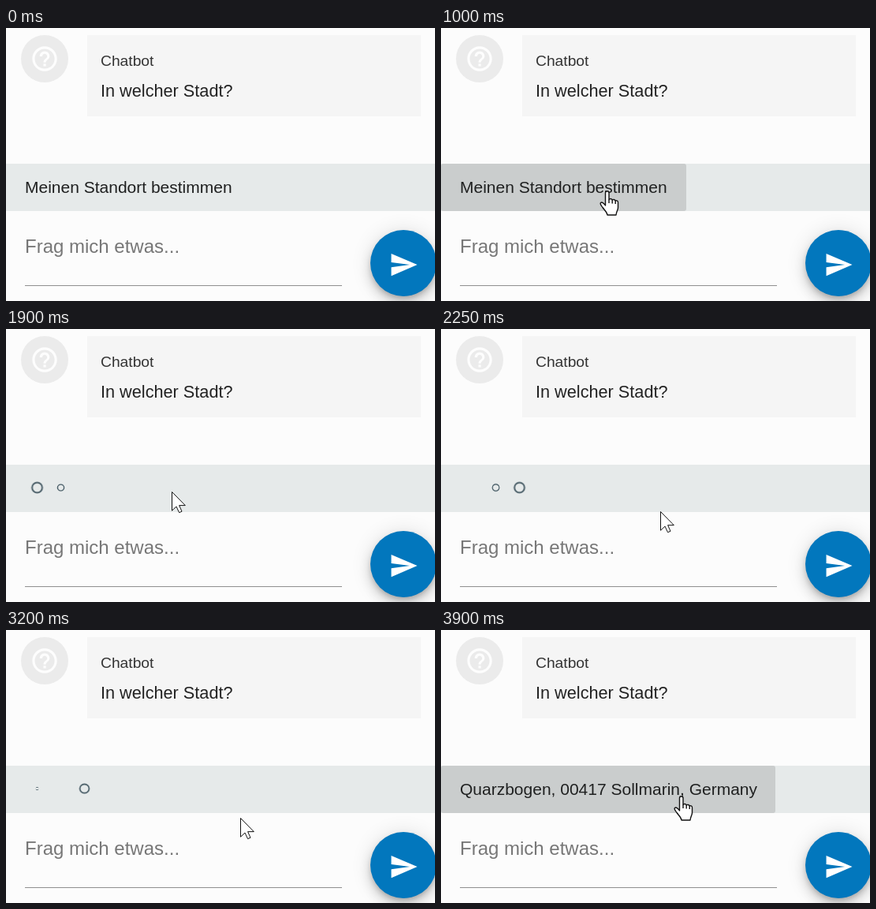
These frames come from a looping animation (544x346 px, 4.25 s). An HTML page:

```html
<!DOCTYPE html>
<html lang="de">
<head>
<meta charset="utf-8">
<title>Chatbot</title>
<style>
  html, body { margin: 0; width: 100%; height: 100%; overflow: hidden; background: #fcfcfc; }
  svg { position: absolute; left: 0; top: 0; width: 544px; height: 346px; }
  text { font-family: "Liberation Sans", Arial, sans-serif; font-size: 21px; fill: #1f2020; }

  .send {
    position: absolute; left: 462px; top: 256px; width: 84px; height: 84px;
    border-radius: 50%; background: #0277bd;
    box-shadow: 0 4.5px 7.5px -1.5px rgba(0,0,0,.2), 0 9px 15px rgba(0,0,0,.14),
                0 1.5px 27px rgba(0,0,0,.12);
  }

  .locate, .address, .dots, .arrow, .hand, .pressed { animation: 4250ms step-end infinite; }
  .locate  { animation-name: locate; }
  .address { animation-name: address; }
  .dots    { animation-name: dots; }
  .arrow   { animation-name: arrow; }
  .hand    { animation-name: hand; }
  .pressed { animation-name: pressed; }
  @keyframes locate  { 0% { opacity: 1 } 36.471%, 100% { opacity: 0 } }
  @keyframes address { 0% { opacity: 0 } 83.529%, 100% { opacity: 1 } }
  @keyframes dots    { 0% { opacity: 0 } 36.471% { opacity: 1 } 83.529%, 100% { opacity: 0 } }
  @keyframes pressed { 0% { opacity: 0 } 31.765%, 100% { opacity: 1 } }
  @keyframes arrow {
    0% { opacity: 0 } 8.235% { opacity: 1 } 17.647% { opacity: 0 }
    34.118% { opacity: 1 } 83.529%, 100% { opacity: 0 }
  }
  @keyframes hand {
    0% { opacity: 0 } 17.647% { opacity: 1 } 34.118% { opacity: 0 } 83.529%, 100% { opacity: 1 }
  }

  .hover { opacity: 0; animation: hover 4250ms linear infinite; }
  @keyframes hover {
    0%, 17% { opacity: 0 } 20%, 36.471% { opacity: .125 }
    36.48%, 84.706% { opacity: 0 } 88.235%, 100% { opacity: .125 }
  }

  .ripple { animation: ripple 4250ms cubic-bezier(0,0,.2,1) infinite; }
  @keyframes ripple {
    0%, 30.588% { transform: scale(0) } 40.588%, 100% { transform: scale(1) }
  }

  /* half-sine pulses of 620 ms, one every 800 ms */
  .dot { fill: none; stroke: #455a64; stroke-width: 2; transform: scale(0); animation: pulse 4250ms infinite; }
  .dot.b { animation-delay: 220ms; }
  .dot.c { animation-delay: 440ms; }
  @keyframes pulse {
    0%, 36.471%, 55.294%, 74.118% { transform: scale(0); animation-timing-function: cubic-bezier(.36,.57,.64,1); }
    43.765%, 62.588%, 81.412% { transform: scale(1); animation-timing-function: cubic-bezier(.36,0,.64,.43); }
    51.059%, 69.882%, 88.706%, 100% { transform: scale(0); }
  }

  .cursor { stroke: #111; stroke-linejoin: round; fill: #fff; animation: move 4250ms cubic-bezier(.45,0,.55,1) infinite; }
  @keyframes move {
    0%, 8.235% { transform: translate(318px, 290px) }
    23.529%, 45.882% { transform: translate(210px, 206px) }
    56.471% { transform: translate(297px, 238px) }
    82.353% { transform: translate(297px, 238px); animation-timing-function: linear }
    84.706% { transform: translate(311px, 226px); animation-timing-function: ease-out }
    91.765%, 100% { transform: translate(304px, 210px) }
  }
</style>
</head>
<body>
<div class="send"></div>
<svg viewBox="0 0 544 346">
  <defs>
    <clipPath id="chip"><rect y="172" width="311" height="60" rx="3"/></clipPath>
  </defs>

  <circle cx="49" cy="39" r="30" fill="#ebebeb"/>
  <path transform="translate(30.2 20.2) scale(1.57)" fill="#fdfdfd" d="M11 18h2v-2h-2v2zm1-16C6.48 2 2 6.48 2 12s4.48 10 10 10 10-4.48 10-10S17.52 2 12 2zm0 18c-4.41 0-8-3.59-8-8s3.59-8 8-8 8 3.59 8 8-3.59 8-8 8zm0-14c-2.21 0-4 1.79-4 4h2c0-1.1.9-2 2-2s2 .9 2 2c0 2-3 1.75-3 5h2c0-2.25 3-2.5 3-5 0-2.21-1.79-4-4-4z"/>
  <rect x="103" y="9" width="423" height="103" fill="#f5f5f5"/>
  <text x="120" y="48" style="font-size:19.25px;fill:#333">Chatbot</text>
  <text x="120" y="87" style="font-size:21.7px;fill:#222">In welcher Stadt?</text>

  <rect y="172" width="544" height="60" fill="#e6eaea"/>
  <g class="locate">
    <rect class="hover" y="172" width="311" height="60" rx="3"/>
    <g class="pressed" clip-path="url(#chip)">
      <g transform="translate(211 206)"><circle class="ripple" r="214" fill-opacity=".1"/></g>
    </g>
    <text x="24" y="209">Meinen Standort bestimmen</text>
  </g>
  <g class="dots">
    <g transform="translate(39.5 201)"><circle class="dot" r="6.6"/></g>
    <g transform="translate(69.5 201)"><circle class="dot b" r="6.6"/></g>
    <g transform="translate(99.5 201)"><circle class="dot c" r="6.6"/></g>
  </g>
  <g class="address">
    <rect class="hover" y="172" width="424" height="60" rx="3"/>
    <text x="24" y="209">Quarzbogen, 00417 Sollmarin, Germany</text>
  </g>

  <text x="24" y="285" style="font-size:24px;fill:#777">Frag mich etwas...</text>
  <rect x="24" y="326" width="402" height="1" fill="#8f8f8f"/>
  <path transform="translate(485.4 281.2) scale(1.57)" fill="#fff" d="M2.01 21L23 12 2.01 3 2 10l15 2-15 2z"/>

  <g class="cursor">
    <path class="arrow" d="M.5.5V24.2L6 19L9.6 26.7L13 25.2L9.6 17.6H17.3Z"/>
    <g class="hand" transform="translate(-9 0)" stroke-width="1.4">
      <path d="M7.5 19V3a2.2 2.2 0 0 1 4.5 0v8.5c.5-1.5 4-1.5 4.2.7.8-1.3 3.7-1 4 1 .8-1 3.3-.6 3.3 1.8v6.5c0 3-2 5-2.5 9.5H10c-.5-4-4-6.5-6-9.5-1.5-2.5-4-4.5-2.5-6 1.5-1.3 4 .2 6 3.5z"/>
      <path fill="none" d="M12 11.5v4.5M16.2 12.2v4.3M20.2 13.2v3.8"/>
    </g>
  </g>
</svg>
</body>
</html>
```
